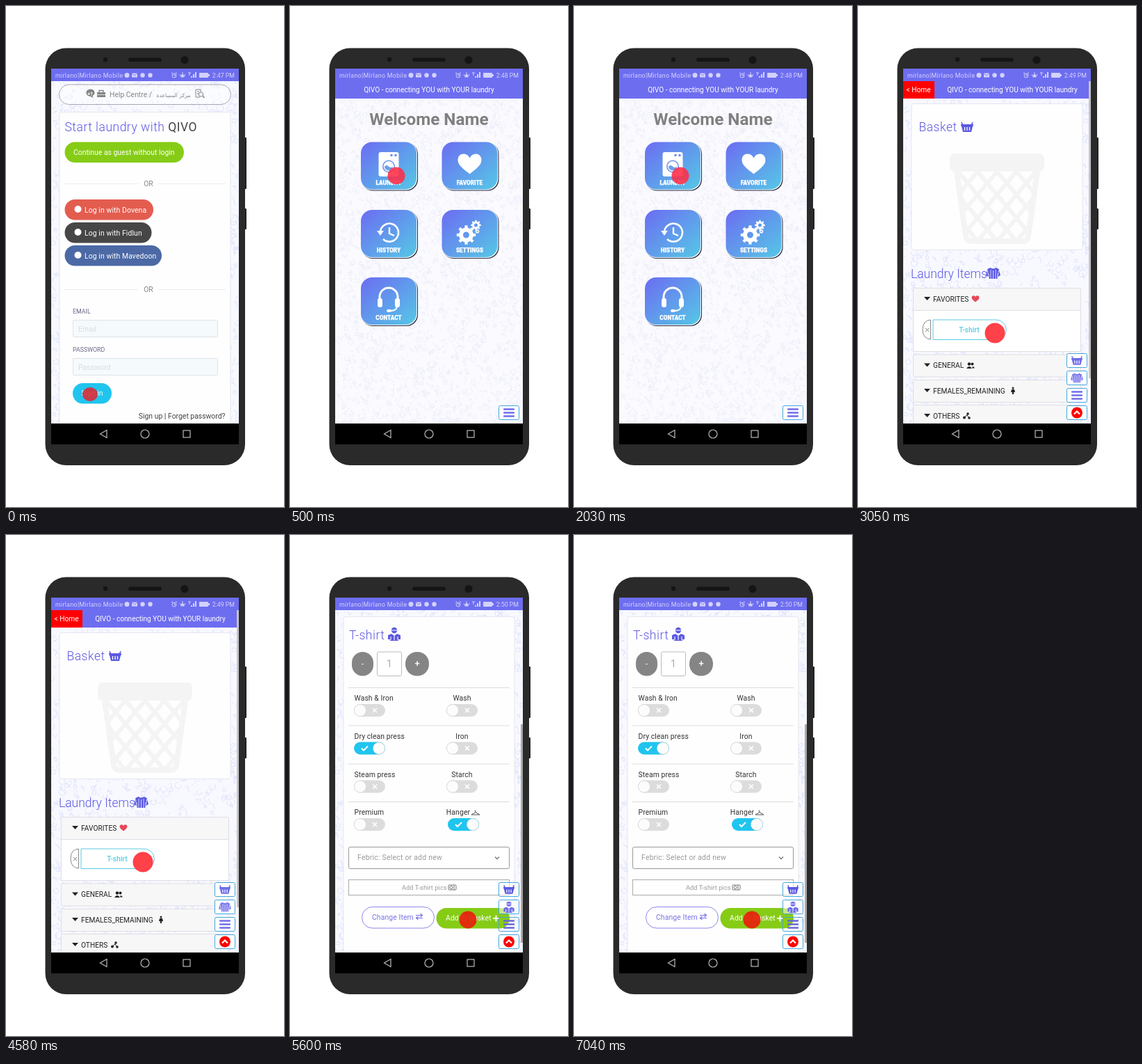
These frames come from a looping animation (400 by 720 pixels, 8000 ms). An HTML page:

```html
<!DOCTYPE html>
<html lang="en">
<head>
<meta charset="utf-8">
<title>Laundry app walkthrough</title>
<style>
html, body { margin: 0; width: 100%; height: 100%; overflow: hidden; background: #fff; }
svg { display: block; width: 400px; height: 720px; font-family: Roboto, sans-serif; }
.scene { visibility: hidden; animation: 8s step-end infinite; }
#login { animation-name: login; }
#home { animation-name: home; }
#basket { animation-name: basket; }
#item { animation-name: item; }
@keyframes login { 0% { visibility: visible } 6.25%, 100% { visibility: hidden } }
@keyframes home { 0% { visibility: hidden } 6.25% { visibility: visible } 38.125%, 100% { visibility: hidden } }
@keyframes basket { 0% { visibility: hidden } 38.125% { visibility: visible } 70%, 100% { visibility: hidden } }
@keyframes item { 0% { visibility: hidden } 70%, 100% { visibility: visible } }
</style>
</head>
<body>
<svg id="stage" viewBox="0 0 400 720"></svg>
<script>
const VIOLET = '#5b58e2', SOFT = '#6f6dea', BAR = '#6d6df0', CYAN = '#1fc5ee', GREEN = '#86cc16', GREY = '#858585';
const MID = 'text-anchor="middle"', LOOSE = 'letter-spacing=".1"';

const rect = (x, y, w, h, fill, r = 0, stroke = 'none', more = '') =>
  `<rect x="${x}" y="${y}" width="${w}" height="${h}" rx="${r}" fill="${fill}" stroke="${stroke}" ${more}/>`;
const disc = (x, y, r, fill, more = '') => `<circle cx="${x}" cy="${y}" r="${r}" fill="${fill}" ${more}/>`;
const path = (d, fill, stroke = 'none', w = 1, more = '') =>
  `<path d="${d}" fill="${fill}" stroke="${stroke}" stroke-width="${w}" ${more}/>`;
const line = (d, stroke, w = 1, more = '') => path(d, 'none', stroke, w, more);
const text = (x, y, size, str, fill, more = '') =>
  `<text x="${x}" y="${y}" font-size="${size}" fill="${fill}" ${more}>${str}</text>`;
const at = (x, y, body, s = 1) => `<g transform="translate(${x} ${y}) scale(${s})">${body}</g>`;
const title = (x, y, str, gap = .5) => text(x, y, 17.5, str, VIOLET, `font-weight="300" letter-spacing="${gap}"`);

// Seeded scatter of little outlines used as wallpaper
function wallpaper(seed, count, size, color, base) {
  const rnd = () => (seed = (seed * 16807) % 2147483647) / 2147483647;
  let d = '';
  for (let i = 0; i < count; i++) {
    const x = (62 + rnd() * 272).toFixed(1), y = (100 + rnd() * 500).toFixed(1);
    const s = (size * (.4 + rnd())).toFixed(1), k = Math.floor(rnd() * 5);
    const q = ((rnd() - .5) * size * 2).toFixed(1);
    d += `M${x} ${y}` + [
      `a${s} ${s} 0 1 0 ${s} ${q}`,
      `l${s} ${q}l${q} ${s}z`,
      `q${s} ${-s} ${s} ${q}t${q} ${s}`,
      `h${s}v${s}h${-s}z`,
      `l${q} ${s}`
    ][k];
  }
  return rect(65, 90, 270, 510, base) + line(d, color, size / 4);
}
const blueWall = () => wallpaper(9217, 1400, 4, '#e1e4fb', '#f8f9ff');

// Icons, centred on 0,0
const HEART = 'M0 14C-7 8-17 2-17-6C-17-12-13-15-9-15C-5-15-2-13 0-9C2-13 5-15 9-15C13-15 17-12 17-6C17 2 7 8 0 14z';
const basketIcon = c => path('M-9-4H9L8.500-1H8L6 7H-6L-8-1H-8.500z', c) + line('M-6-2L-8-7M6-2L8-7', c, 1.6) +
  line('M-3.500 0V5M0 0V5M3.500 0V5', '#fff', 1.3);
const shirtIcon = c => path('M-4-8Q0-5 4-8L8-6L10.500 3L7 5L6 0V8H-6V0L-7 5L-10.500 3L-8-6z', c) +
  line('M-3.500-5V8M0-4V8M3.500-5V8M-8-4L-7 3M8-4L7 3', '#fff', .8);
const personIcon = c => disc(0, -5, 4.2, c) + path('M-9 2L-4 0L0 3L4 0L9 2V8H6V10H-6V8H-9z', c) +
  line('M-4-5H4M0 3V9M-5 4V9M5 4V9', '#fff', 1.1);
const barsIcon = c => [-5, 0, 5].map(y => rect(-8, y - 1.3, 16, 2.6, c, 1)).join('');
const upIcon = disc(0, 0, 8, '#f00') + line('M-4 2L0-2L4 2', '#fff', 2.2);
const washerIcon = rect(-14.5, -17.5, 29, 35, '#fff', 3) + disc(0, 3, 9, '#6c8fec') + disc(0, 3, 7.4, '#fff') +
  path('M-6 3Q-3 0 0 3T6 3A6 6 0 0 1-6 3z', '#6c9fec') + disc(4, -13, 1.8, '#6c8fec') + disc(10, -13, 1.8, '#6c8fec');
const clockIcon = line('M-12 1A13 13 0 1 1-8 10', '#fff', 2.6) + path('M-17-2H-7L-12 5z', '#fff') +
  line('M1-7V2L8 5', '#fff', 2.4);
const gear = (r, hole) => {
  const teeth = [...Array(8)].map((_, i) =>
    rect(-r * .2, -r * 1.3, r * .4, r * .6, '#fff', 0, 'none', `transform="rotate(${i * 45})"`)).join('');
  return teeth + disc(0, 0, (r + hole) / 2, 'none', `stroke="#fff" stroke-width="${r - hole}"`);
};
const gearsIcon = at(-5, 4, gear(10.5, 4.5)) + at(9, -10, gear(5.6, 2.5)) + at(11, -1, gear(2.4, 1));
const phonesIcon = line('M-13 2V-4A13 13 0 0 1 13-4V2', '#fff', 3) + rect(-16, -2, 7, 13, '#fff', 3) +
  rect(9, -2, 7, 13, '#fff', 3) + line('M12 10Q11 16 3 16', '#fff', 2) + rect(-3, 14, 7, 4, '#fff', 2);

function statusBar(time) {
  const c = '#d3d2fb';
  return rect(65, 90, 270, 18, BAR) + text(71, 102.5, 8.8, 'mirlano|Mirlano Mobile', c, 'letter-spacing=".33"') +
    disc(174, 99.5, 3.5, c) + rect(181, 96.5, 8, 6, c) + line('M181 97L185 100L189 97', BAR, .8) +
    disc(196.5, 99.5, 3.2, c) + disc(207.5, 99.5, 3.2, c) +
    disc(242, 100, 3, 'none', `stroke="${c}"`) + line('M242 98V100H244M238 97L240 95.5M246 97L244 95.5', c) +
    disc(254, 100, 2, c) + line('M250 98L252 102H256L258 98M254 95V98', c) +
    path('M266 103H268V101H266zM269 103H271V98H269zM272 103H274V95H272z', c) + line('M262 96H266M264 96V100', c) +
    rect(278, 96, 13, 7, c, 1) + rect(291, 98, 2, 3, c) +
    text(329, 102.5, 8.8, time + ' PM', c, 'text-anchor="end"');
}
const header = (x, extra = '') => rect(65, 107, 270, 26, BAR) + extra +
  text(x, 124, 10.1, 'QIVO - connecting YOU with YOUR laundry', '#fff', MID);
const side = (y, icon, fill = '#fff') => rect(300.5, y + .5, 29, 20, fill, 2, '#45a5dc') + at(315, y + 10.5, icon);
const scroll = (y, h, fill) => rect(332, y, 3, h, fill);
const scene = (id, time, body) => `<g id="${id}" class="scene">${body}${statusBar(time)}</g>`;
const card = (y, h) => rect(77, y, 246, h, '#fefefe', 3, '#e6e6ee');

function loginScene() {
  const or = y => line(`M84 ${y}H190M219 ${y}H316`, '#ececf0') + text(205, y + 3.5, 10.3, 'OR', GREY, MID);
  const social = (y, w, fill, name) => rect(84.5, y, w, 29.5, fill, 14.7) + disc(103.5, y + 14, 5, '#fff') +
    text(113, y + 18.5, 10.4, 'Log in with ' + name, '#fff', LOOSE);
  const field = (y, label, hint) => text(96, y - 9.5, 8.8, label, '#6a6888') +
    rect(96.5, y + .5, 208, 24, '#f5fafc', 1, '#dde3e8') + text(104, y + 16.5, 10.4, hint, '#d8dcdf', LOOSE);
  return blueWall() +
    rect(76.5, 113, 247, 28.5, '#ffffff66', 14.2, '#a9a8b6') +
    path('M115.5 125a6 5 0 1 1 9 4l1 3l-4-2a6 5 0 0 1-6-5z', GREY) + text(121, 128.5, 7, '+?', '#fff', MID + ' font-weight="700"') +
    path('M131 124H143V131H131z', GREY) + line('M134 124V121.5H140V124', GREY, 1.4) + line('M131 127.5H143', '#eee', .8) +
    text(149, 131, 10.4, 'Help Centre /', GREY) +
    text(241, 130.5, 7.6, 'مركز المساعدة', GREY, MID + ' font-family="DejaVu Sans, sans-serif"') +
    line('M279 131H273V120H280V124M275 123H278M275 126H277', GREY) + disc(280.5, 127, 3.2, 'none', `stroke="${GREY}"`) + line('M283 129L285.5 132', GREY, 1.4) +
    card(152.5, 460) + title(84.5, 180, 'Start laundry with <tspan fill="#444" font-weight="400">QIVO</tspan>') +
    rect(84.5, 195.5, 171.5, 29.5, GREEN, 14.7) + text(97, 214, 10.4, 'Continue as guest without login', '#fff') +
    or(255.5) + social(278, 127.5, '#e35d4f', 'Dovena') + social(311, 125, '#464646', 'Fidlun') +
    social(344, 139.5, '#4c69a5', 'Mavedoon') + or(407.5) +
    field(451, 'EMAIL', 'Email') + field(506, 'PASSWORD', 'Password') +
    rect(96, 542, 56, 29.5, CYAN, 14.7) + text(124, 560, 10.4, 'Sign in', '#fff', MID) +
    `<ellipse cx="121" cy="558" rx="11" ry="10" fill="#d82c38" opacity=".9"/>` +
    text(315.5, 593, 10.4, 'Sign up <tspan font-weight="700">|</tspan> Forget password?', '#444', 'text-anchor="end"');
}

function homeScene() {
  const tile = (x, y, name, icon) => rect(x + 1, y + 1, 81, 69, '#26263c', 16) + rect(x, y, 81, 69, '#fff', 16) +
    rect(x, y, 80, 68, 'url(#sky)', 16) + at(x + 40, y + 32, icon) +
    text(x + 40, y + 61, 8.2, name, '#fff', MID + ' font-weight="900" stroke="#fff" stroke-width=".25"');
  return wallpaper(48271, 2700, 3.4, '#ececf8', '#fafaff') + header(200) +
    text(200, 171, 24.3, 'Welcome Name', '#808080', MID + ' font-weight="700"') +
    tile(102, 195.5, 'LAUNDRY', washerIcon) + tile(218.5, 195.5, 'FAVORITE', path(HEART, '#fff')) +
    tile(102, 293, 'HISTORY', clockIcon) + tile(218.5, 293, 'SETTINGS', gearsIcon) +
    tile(102, 390, 'CONTACT', phonesIcon) +
    disc(153, 244, 12.5, '#ff2c46', 'opacity=".88"') + side(574, barsIcon(SOFT));
}

function basketScene() {
  const fold = (y, name, h = 32) => rect(79.5, y + .5, 241, h, '#f7f7f8', 2, '#dfdfe4') +
    path(`M95 ${y + 13}H104L99.5 ${y + 18}z`, '#222') + text(108, y + 19.5, 10.2, name, '#222');
  let mesh = '';
  for (let x = 60; x < 350; x += 28) mesh += `M${x} 238l84 100M${x} 238l-84 100`;
  return blueWall() + header(222, rect(65, 108, 45, 25, '#f00') + text(87, 124, 10.2, '&lt; Home', '#fff', MID)) +
    card(140.5, 210) + title(87.5, 180, 'Basket') + at(157, 174, basketIcon(VIOLET)) +
    rect(132, 212, 136, 26, '#f4f4f4', 7) + line(mesh, '#f4f4f4', 6, 'clip-path="url(#bin)"') +
    line('M142 238L155 331Q156 338 165 338H235Q244 338 245 331L258 238', '#f4f4f4', 8) +
    title(76, 391, 'Laundry Items', 0) + at(194.5, 384, shirtIcon(VIOLET)) +
    rect(79.5, 405.5, 241, 91, '#fff', 2, '#dfdfe4') + fold(405, 'FAVORITES') +
    at(169, 421, path(HEART, '#e8485a'), .32) +
    path('M104.5 451V479Q93 478 93 465T104.5 451z', '#fff', '#888') + line('M97 463L102 468M102 463L97 468', '#777') +
    path('M108 451H199A14 14 0 0 1 199 479.5H108z', '#fff', '#58cbe4') + text(160, 469, 10.4, 'T-shirt', '#5acde8', MID + ' font-weight="500"') +
    disc(197, 470, 14.5, '#ff4149') +
    fold(500.5, 'GENERAL') + disc(160, 514.5, 2.3, '#222') + disc(164.5, 514.5, 2, '#222') + path('M156 521Q160 515 164 521zM164 520.5Q165 515.5 168 520.5z', '#222') +
    fold(537, 'FEMALES_REMAINING') + disc(223, 549, 1.5, '#222') + path('M221 551H225L226 555H224V558H222V555H220z', '#222') +
    fold(573, 'OTHERS', 40) + line('M153 591L157 588L160 592M157 588L158 585', '#222') + disc(153, 591.5, 2, '#222') + disc(158, 586, 1.8, '#222') + disc(160, 592, 1.8, '#222') +
    scroll(108, 427, '#c4c4c8') + side(499, at(0, 0, basketIcon(SOFT), .9)) + side(524, at(0, 0, shirtIcon('#7d7bec'), .85)) +
    side(549, barsIcon(SOFT)) + side(574, upIcon);
}

function itemScene() {
  const toggle = (x, y, on) => rect(x, y, 45, 18, on ? CYAN : '#dcdcdc', 9) +
    disc(x + (on ? 36 : 9), y + 9, 8.6, '#fcfcfc', 'stroke="#ccc" stroke-width=".6"') +
    (on ? line(`M${x + 11} ${y + 9}l3 3l6-6`, '#fff', 2) : line(`M${x + 27} ${y + 6}l6 6m0-6l-6 6`, '#fff', 1.6));
  const row = (y, left, right, leftOn, rightOn) => line(`M84 ${y + .5}H316`, '#dcdcdc') +
    text(92.5, y + 19, 10.4, left, '#333', LOOSE) + toggle(92, y + 24, leftOn) +
    text(rightOn ? 242 : 247.5, y + 19, 10.4, right, '#333', MID + ' ' + LOOSE) +
    toggle(rightOn ? 227 : 225, y + 24, rightOn);
  return blueWall() + card(117.5, 490) + title(85, 150, 'T-shirt') + at(150, 142, personIcon(VIOLET)) +
    rect(89, 168, 31, 34.5, GREY, 15.5) + text(104.5, 189, 12, '-', '#fff', MID) +
    rect(125.5, 168, 35, 34.5, '#fff', 2, '#bbb') + text(143, 190, 14, '1', '#aaa', MID) +
    rect(166, 168, 34, 34.5, GREY, 16.5) + text(183, 189, 13, '+', '#fff', MID + ' font-weight="500"') +
    row(219, 'Wash &amp; Iron', 'Wash') + row(273.5, 'Dry clean press', 'Iron', true) +
    row(328.5, 'Steam press', 'Starch') + row(383, 'Premium', 'Hanger', false, true) +
    line('M261 402H273L267 398.5zM267 398.5V396.5H265.5', '#555') +
    rect(84.5, 448.5, 231, 31, '#fff', 2, '#999') + text(97, 466.5, 10.4, 'Febric: Select or add new', '#999', 'letter-spacing=".25"') +
    line('M295 462.5L298 465.5L301 462.5', '#777', 1.3) +
    rect(84.5, 495.5, 231, 22, '#fff', 0, '#aaa') + text(161, 510, 9.2, 'Add T-shirt pics', '#999', LOOSE) +
    rect(228, 503, 11, 7, 'none', 1, '#777') + disc(232, 506.5, 2, 'none', 'stroke="#777"') + line('M236 503V510', '#777') +
    rect(103.5, 534.5, 104, 30.5, '#fff', 15.2, '#8a88ee') + text(118, 553, 10.4, 'Change Item', '#7774e8', LOOSE) +
    line('M181 546.5H190M187.5 544L190.5 546.5L187.5 549M191 550.5H182M184.5 548L181.5 550.5L184.5 553', '#7774e8', 1.2) +
    rect(210.5, 536, 105.5, 29.5, GREEN, 14.7) + text(224, 554, 10.4, 'Add to Basket', '#fff', LOOSE) +
    line('M292 551H301M296.5 546.5V555.5', '#fff', 1.8) + disc(256, 553, 12.5, '#e8200c', 'opacity=".92"') +
    scroll(272, 314, '#aaa') + side(499, at(0, 0, basketIcon(VIOLET), .9), '#fff8') + side(524, at(0, 0, personIcon(SOFT), .85), '#fff8') +
    side(549, barsIcon('#6865d8'), 'none') + side(574, upIcon);
}

document.getElementById('stage').innerHTML = `<defs>
  <linearGradient id="sky" x2="1" y2="1"><stop stop-color="#6c6cf2"/><stop offset="1" stop-color="#55c8e6"/></linearGradient>
  <clipPath id="screen"><rect x="65" y="90" width="270" height="510"/></clipPath>
  <clipPath id="bin"><path d="M142 236H258L244 340H156z"/></clipPath></defs>` +
  rect(340, 189, 6, 74, '#222', 1) + rect(340, 291, 6, 30, '#222', 1) +
  rect(56.5, 60.5, 287.5, 599.5, '#2a2a2a', 30) +
  disc(143, 77, 3.2, '#151515') + rect(176, 74.5, 48, 5.5, '#151515', 2.7) + disc(257, 77.5, 5.5, '#151515') +
  rect(65, 90, 270, 540, '#000') +
  line('M135.5 615L145 609.5V620.5z', '#bbb', 1.2) + disc(200, 615, 6, 'none', 'stroke="#bbb" stroke-width="1.2"') +
  rect(255, 610, 10, 10, 'none', 0, '#bbb', 'stroke-width="1.2"') +
  '<g clip-path="url(#screen)">' + scene('login', '2:47', loginScene()) + scene('home', '2:48', homeScene()) +
  scene('basket', '2:49', basketScene()) + scene('item', '2:50', itemScene()) + '</g>';
</script>
</body>
</html>
```
